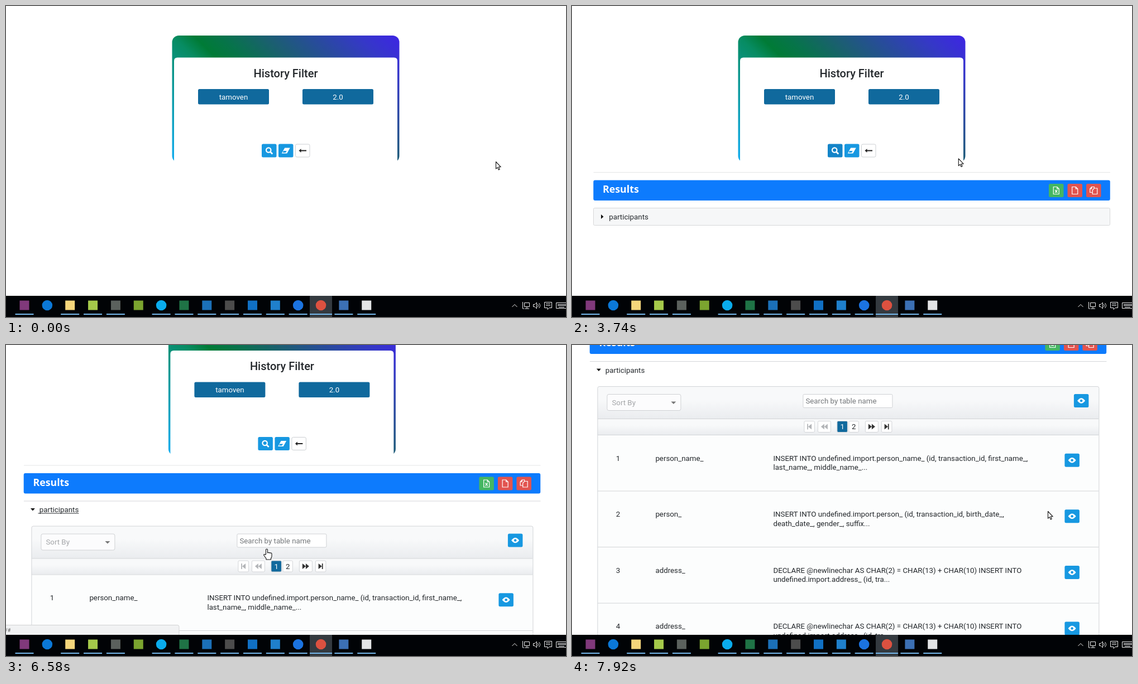
An HTML page that plays this animation: 1003 px wide and 558 px high, repeating every 8000 ms.

```html
<!DOCTYPE html>
<html lang="en">
<head>
<meta charset="utf-8">
<title>History Filter</title>
<style>
html, body { margin: 0; width: 100%; height: 100%; overflow: hidden; background: #fff; }
svg { display: block; width: 1003px; height: 558px; }
text { font: 13.3px Roboto, sans-serif; fill: #24282c; white-space: pre; }
.title { font-size: 20px; font-weight: 500; }
.heading { font: 600 17.8px 'Noto Sans', sans-serif; }
.address { font-size: 9px; fill: #555; }
.mid { text-anchor: middle; }
.light { fill: #fff; }
.muted { fill: #a3a5a8; }
.hint { fill: #75787b; }
</style>
</head>
<body>
<svg viewBox="0 0 1003 558" xmlns="http://www.w3.org/2000/svg">
  <defs>
    <linearGradient id="cardFill" gradientUnits="userSpaceOnUse" x1="298" y1="281" x2="615" y2="-36">
      <stop offset="0" stop-color="#12adf0"/>
      <stop offset=".36" stop-color="#078c62"/>
      <stop offset=".42" stop-color="#007b36"/>
      <stop offset=".5" stop-color="#07734b"/>
      <stop offset=".62" stop-color="#1b5f70"/>
      <stop offset=".88" stop-color="#3538c7"/>
      <stop offset="1" stop-color="#3d25e4"/>
    </linearGradient>
    <linearGradient id="barFill" x1="0" y1="0" x2="0" y2="1">
      <stop offset=".4" stop-color="#f8f9fa"/>
      <stop offset="1" stop-color="#eaecef"/>
    </linearGradient>
    <clipPath id="panelClip"><rect id="panelWindow" y="397" width="1003" height="0"/></clipPath>
  </defs>
  <rect width="1003" height="558" fill="#fff"/>
  <g id="page">
    <rect x="297.5" y="53" width="407" height="228" rx="12" fill="url(#cardFill)"/>
    <path d="M301 290V98.5q0-6 6-6H695q6 0 6 6V290z" fill="#fff"/>
    <text class="title mid" x="501" y="127.5">History Filter</text>
    <g id="filters"></g>
    <g id="results">
      <path d="M38.5 298.5H964" stroke="#e4e5e6"/>
      <rect x="38.3" y="312.5" width="925.5" height="36.5" rx="3" fill="#0d7bfd"/>
      <text class="heading light" x="55" y="335.3">Results</text>
      <g id="exports"></g>
      <rect id="row" x="38.5" y="362.5" width="925" height="31" rx="2"/>
      <path id="openLine" d="M38.5 362.5H964" stroke="#d4d6d9"/>
      <path id="caret" fill="#111"/>
      <text x="66.3" y="382.5">participants</text>
      <path id="underline" d="M64 384.5H137" stroke="#24282c"/>
      <g id="panel" clip-path="url(#panelClip)"></g>
    </g>
    <g id="tips"></g>
  </g>
  <g id="status">
    <path d="M-1 502.5H307q3 0 3 3V521H-1z" fill="#f1f2f3" stroke="#d2d3d4"/>
    <text class="address" x="-1" y="514.5">/#</text>
  </g>
  <g id="taskbar"></g>
  <g id="cursor" stroke="#111" fill="#fff" stroke-width="1.1" stroke-linejoin="round">
    <path id="arrow" d="M.5 .5V13.2L3.4 10.6L5.3 15L7.3 14.1L5.4 9.8H9.3z"/>
    <path id="hand" d="M-1.5 9.5V1.5q0-1.5 1.5-1.5t1.5 1.5V7q1.2-1.5 2.7 0q1.2-1 2.5 .3q2-.6 2.3 1.3V13q0 2-1.5 3.5V19H-1V17L-5 11.5q-.8-1.6 .6-2q1-.2 1.8 .9z"/>
  </g>
</svg>
<script>
const $ = id => document.getElementById(id);
const add = (id, ...markup) => $(id).insertAdjacentHTML('beforeend', markup.flat().join(''));
const rect = (x, y, w, h, fill, more = 'rx="2.5"') =>
  `<rect x="${x}" y="${y}" width="${w}" height="${h}" fill="${fill}" ${more}/>`;
const label = (x, y, s, kind = '') => `<text x="${x}" y="${y}" class="${kind}">${s}</text>`;
const at = (x, y, markup) => `<g transform="translate(${x} ${y})">${markup}</g>`;
const line = (d, color, width = 1) =>
  `<path d="${d}" fill="none" stroke="${color}" stroke-width="${width}"/>`;
const shape = (d, fill) => `<path d="${d}" fill="${fill}"/>`;
const BLUE = '#1798e1', DEEP = '#10699d', BORDER = '#d2d4d7';
const GREEN = '#44b662', RED = '#e2544f';

// Icons are centred on 0,0.
const sheet = line('M-5 -6.5H1.5L5 -3V6.5H-5zM1.5 -6.5V-3H5', '#fff', 1.2);
const icons = {
  search: '<circle cx="-1" cy="-1" r="4.2" fill="none" stroke="#fff" stroke-width="2.2"/>' + line('M2 2L6 6', '#fff', 2.6),
  eraser: shape('M-2 -5H7.5L2 5H-7.5z', '#fff') + shape('M-4.2 .5H1.5L-.5 3.5H-5.8z', BLUE),
  eye: shape('M-7 0Q0 -9.5 7 0Q0 9.5 -7 0z', '#fff') + `<circle r="2.3" fill="${BLUE}"/>`,
  file: sheet,
  excel: sheet + line('M-2 -1L2 4M2 -1L-2 4', '#fff', 1.3),
  files: line('M-2 3.5H-6.5V-3L-3.5 -6.5H1V-4M-2 6.5V-.5L1 -4H6.5V6.5zM-6.5 -3H-3.5V-6.5', '#fff', 1.2)
};
const ARROW_LEFT = 'M-7 0L-3 -3.5V-1H6.5V1H-3V3.5z';
const FIRST = 'M-4 -5h1.8v10H-4zM4 -5V5L-2.2 0z';
const PREVIOUS = 'M0 -5V5L-6 0zM6 -5V5L0 0z';
const flip = markup => `<g transform="scale(-1 1)">${markup}</g>`;
const button = (x, y, icon, fill = BLUE, more) =>
  rect(x, y, 26.5, 24, fill, more) + at(x + 13.25, y + 12, icons[icon]);
const choice = (x, s) => rect(x, 149, 127, 27.5, DEEP) + label(x + 63.5, 167.5, s, 'mid light');

add('filters', choice(344, 'tamoven'), choice(531, '2.0'),
  button(458, 247.5, 'search', BLUE, 'id="searchBtn" rx="2.5"'),
  button(488, 247.5, 'eraser'),
  rect(518.5, 248, 25.5, 23, '#fff', 'id="backBtn" rx="2.5"'),
  `<g id="backIcon">${at(531.5, 259.5, `<path d="${ARROW_LEFT}"/>`)}</g>`);

add('exports', ['excel', 'file', 'files'].map((icon, i) =>
  button(854 + i * 33.5, 319, icon, i ? RED : GREEN)));

const insert = 'INSERT INTO undefined.import.';
const address = ['address_', 'DECLARE @newlinechar AS CHAR(2) = CHAR(13) + CHAR(10) INSERT INTO',
  'undefined.import.address_ (id, tra...'];
const rows = [
  ['person_name_', insert + 'person_name_ (id, transaction_id, first_name_,', 'last_name_, middle_name_...'],
  ['person_', insert + 'person_ (id, transaction_id, birth_date_,', 'death_date_, gender_, suffix...'],
  address, address
];
const tableRow = ([name, first, second], i) => at(0, i * 100.6,
  label(89, 540.5, i + 1, 'mid') + label(156, 540.5, name) +
  label(367, 540.5, first) + label(367, 557, second) +
  button(889, 527.7, 'eye') + line('M52.5 595H950', BORDER));
const pager = (x, w, content, fill = '#fff') =>
  rect(x + .5, 469.5, w - 1, 20, fill, 'rx="2" stroke="#d3d5d8"') + at(x + w / 2, 479.5, content);

add('panel',
  rect(52.5, 407.5, 898, 700, '#fcfdfd', 'rx="3"'),
  rect(52.5, 407.5, 898, 58, 'url(#barFill)'), rect(52.5, 466, 898, 28, 'url(#barFill)', ''),
  line('M52.5 465.5H950M52.5 494.5H950', BORDER),
  rect(69.5, 421.5, 132, 29, '#fcfcfd', 'rx="3" stroke="#cfd1d4"'),
  label(78, 440.5, 'Sort By', 'muted'), shape('M184 434.5h9l-4.5 4.5z', '#777'),
  rect(420.5, 421.5, 160, 24, '#fff', 'rx="2" stroke="#cfd1d4"'),
  label(425, 438, 'Search by table name', 'hint'),
  button(905.5, 421, 'eye'),
  pager(422, 19.5, shape(FIRST, '#b3b5b8')), pager(446.5, 24, shape(PREVIOUS, '#b3b5b8')),
  pager(481, 19.5, label(0, 4.7, '1', 'mid light'), DEEP), pager(502, 18.5, label(0, 4.7, '2', 'mid')),
  pager(531.5, 24, flip(shape(PREVIOUS, '#333'))), pager(560.5, 19.5, flip(shape(FIRST, '#333'))),
  rows.map(tableRow),
  rect(52.5, 407.5, 898, 700, 'none', `rx="3" stroke="${BORDER}"`));

const tip = (id, centre, w, s) => `<g id="${id}">${rect(centre - w / 2, 275, w, 23, '#1d2226')}` +
  label(centre, 291, s, 'mid light') + '</g>';
add('tips', tip('backTip', 531, 95, 'Back to home'),
  tip('eraserTip', 501, 160, 'Clear all filter fields'), tip('searchTip', 471.5, 97, 'Search history'));

const appColors = ['#80397b', '#0b78d7', '#f5d67b', '#a5c94a', '#5b615d', '#7ba52f', '#0aaced', '#1f7346',
  '#1b70b8', '#4c4c4c', '#1070c4', '#1f80cc', '#1b73e0', '#dc5140', '#3c70b4', '#e4e5e6'];
const roundApps = [1, 6, 12, 13], idleApps = [1, 5], activeApp = 13;
const app = (color, i) => {
  const w = i === activeApp ? 40 : 33;
  const icon = roundApps.includes(i) ? `<circle r="9.3" fill="${color}"/>` : rect(-8.5, -8.5, 17, 17, color, '');
  return at(33 + i * 40.85, 537, (i === activeApp ? rect(-20, -17, 40, 38, '#343a40', '') : '') +
    icon + (idleApps.includes(i) ? '' : rect(-w / 2, 15, w, 2, '#76b9ed', '')));
};
const tray = d => line(d, '#eee');
add('taskbar', rect(0, 520, 1003, 38, '#010306', ''), appColors.map(app),
  tray('M906.5 540L911 535.5L915.5 540'),
  tray('M928.5 532.5H937.5V539.5H928.5zM933 539.5V543M929 543H937M925.5 531V543H928'),
  tray('M944.5 535.5H947L950.5 532V543L947 539.5H944.5zM952.5 535q2 2.5 0 5M954.5 533q4 4.5 0 9'),
  tray('M964.5 531.5H977.5V541.5H973L970 544.5V541.5H964.5zM967 534.5H975M967 537.5H975'),
  tray('M1004 532.5H985.5V542.5H1004M988 535.5H1003M988 537.5H1003M990 540.5H1000'));

// Moves: start time, end time, then where to go. Between moves everything rests.
const pointerMoves = [
  [210, 510, 46, 383], [510, 590, 89, 297], [730, 950, 448, 175], [950, 1090, 677, 194],
  [1090, 1240, 530, 270], [1330, 1400, 500, 268], [1480, 1530, 470, 266], [2060, 2220, 525, 286],
  [2740, 2900, 694, 273], [3740, 3960, 210, 371], [4100, 4180, 96, 386], [4870, 4950, 140, 379],
  [5100, 5180, 94, 378], [5760, 6240, 467, 366], [7250, 7410, 514, 349], [7560, 7900, 852, 298]
];
const scrollMoves = [[6430, 6580, 82.5], [6640, 7030, 251.5], [7090, 7190, 333]];
const SHOW_RESULTS = 2520, LINK_HOVER = 4100, OPEN = 5740, LEAVE_LINK = 7250, HIDE_STATUS = 7600;

const progress = (t, from, to) => Math.min(1, Math.max(0, (t - from) / (to - from)));
const follow = (moves, t, origin) => moves.reduce((place, [from, to, ...goal]) =>
  place.map((v, i) => v + (goal[i] - v) * progress(t, from, to)), origin);
const during = (t, from, to) => t >= from && t < to;
const show = (id, on) => $(id).style.display = on ? '' : 'none';
const set = (id, values) => Object.entries(values).forEach(([k, v]) => $(id).setAttribute(k, v));

function draw(t) {
  const [x, y] = follow(pointerMoves, t, [877, 279]);
  const [scroll] = follow(scrollMoves, t, [0]);
  const inside = (left, top, w, h) => during(x, left, left + w) && during(y, top, top + h);
  const open = t > OPEN;
  const grow = progress(t, OPEN, OPEN + 350);

  // The page reacts to the pointer only when it moves, so scrolling keeps the last hover.
  const overRow = during(t, SHOW_RESULTS, LEAVE_LINK) && inside(38, 362, 926, 32);
  const overBack = inside(518, 247, 27, 25);
  const overEraser = inside(488, 247, 27, 25);
  const overSearch = inside(458, 247, 27, 25);
  const overChoice = inside(344, 149, 127, 28) || inside(531, 149, 127, 28);
  const hand = overRow || overBack || overEraser || overSearch || overChoice;

  set('page', { transform: `translate(${open ? -6.6 : 0} ${-scroll})` });
  set('panelWindow', { height: 760 * grow * grow * (3 - 2 * grow) });
  show('results', t >= SHOW_RESULTS);
  show('row', !open);
  show('openLine', open);
  set('row', overRow ? { fill: '#ebebec', stroke: '#c4c5c6' } : { fill: '#f6f7f8', stroke: '#d7d8d9' });
  set('caret', { d: open ? 'M50.5 375.5h8l-4 4.5z' : 'M52 374v8l4.5 -4z' });
  show('underline', during(t, LINK_HOVER, LEAVE_LINK));
  show('status', during(t, LINK_HOVER, HIDE_STATUS));

  set('searchBtn', { fill: during(t, 1500, OPEN) ? '#1384c8' : BLUE });
  set('backBtn', overBack ? { fill: '#f0f7fd', stroke: '#4aa9e2' } : { fill: '#fff', stroke: '#cccfd2' });
  set('backIcon', { fill: overBack ? '#fff' : '#222' });
  set('backTip', { opacity: overBack ? .09 : 0 });
  set('eraserTip', { opacity: overEraser ? .09 : 0 });
  set('searchTip', { opacity: during(t, 1610, 1830) ? .85 * progress(t, 1590, 1710) : 0 });

  set('cursor', { transform: `translate(${x} ${y})` });
  show('hand', hand);
  show('arrow', !hand);
}

const start = performance.now();
function tick() {
  draw((performance.now() - start) % 8000);
  requestAnimationFrame(tick);
}
tick();
</script>
</body>
</html>
```
